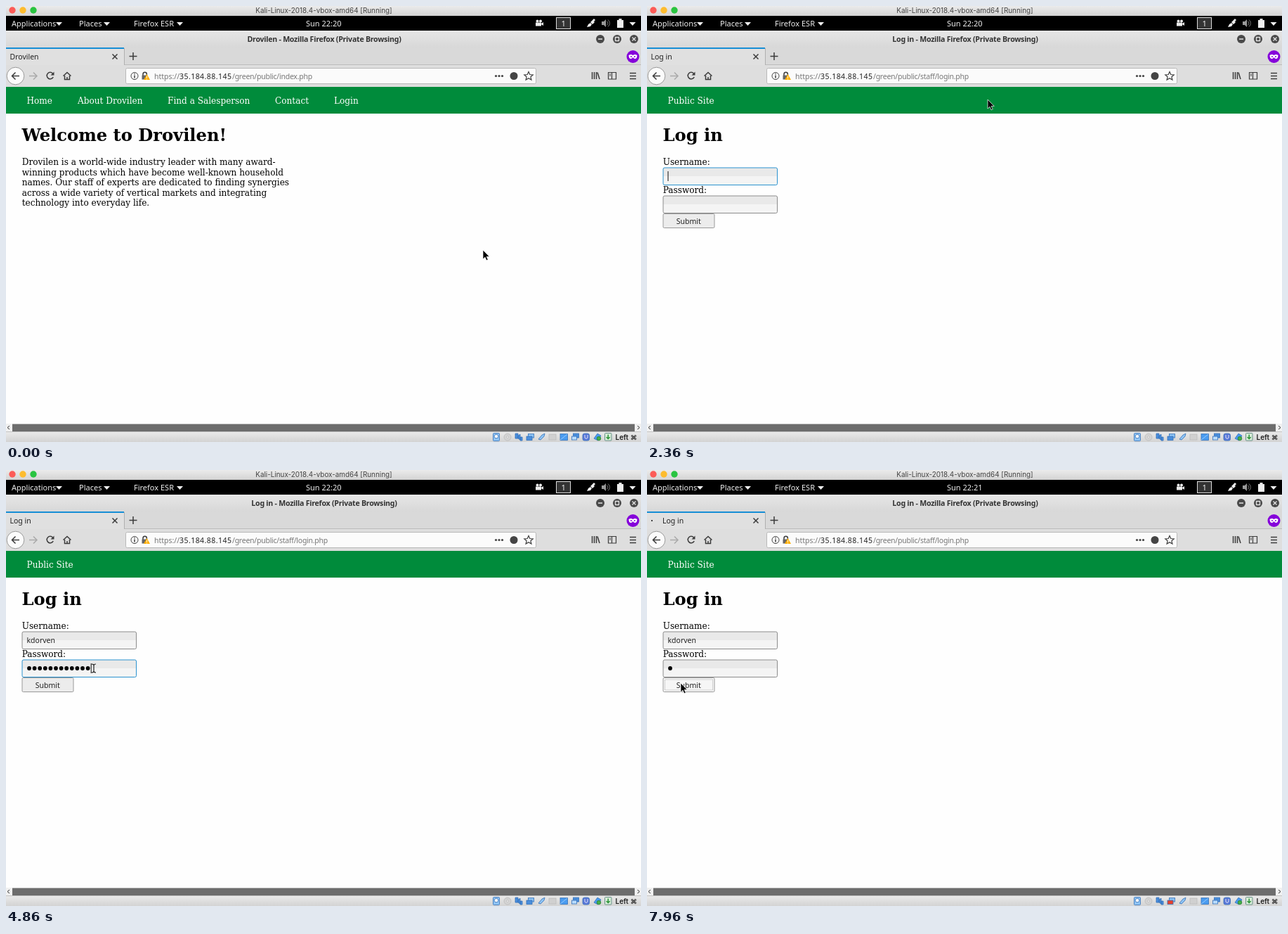
Animation, 904 px wide and 620 px high, one loop 8 s. Source, as an HTML page:

```html
<!DOCTYPE html>
<html lang="en">
<head>
<meta charset="utf-8">
<title>Login demo</title>
<style>
html, body { margin: 0; width: 100%; height: 100%; overflow: hidden; background: #fefefe; }
svg { display: block; }
text { white-space: pre; }
.ui { font: 10.5px "Noto Sans", "Open Sans", sans-serif; fill: #222; }
.panel { font: 11px "Noto Sans", "Open Sans", sans-serif; fill: #eee; }
.title { font: bold 10.6px "Noto Sans", "Open Sans", sans-serif; letter-spacing: -.25px; fill: #333; text-anchor: middle; }
.mac { font: 9.9px Inter, "Liberation Sans", sans-serif; fill: #444; text-anchor: middle; }
.page { font: 12.1px "DejaVu Serif", serif; fill: #000; }
.nav { fill: #fff; }
.h1 { font-size: 24.2px; font-weight: bold; }
.dim { fill: #777; }
.line { fill: none; stroke: #3c3c3c; stroke-width: 1.5; }
.field { fill: url(#input); stroke: #8c8c8c; }
.field.on { stroke: #2a92cf; }
</style>
</head>
<body>
<svg width="904" height="620" viewBox="0 0 904 620">
  <defs>
    <linearGradient id="mac" x2="0" y2="1"><stop stop-color="#ebebeb"/><stop offset="1" stop-color="#d3d3d3"/></linearGradient>
    <linearGradient id="bar" x2="0" y2="1"><stop stop-color="#e6e6e6"/><stop offset="1" stop-color="#d8d8d8"/></linearGradient>
    <linearGradient id="input" x2="0" y2="1"><stop offset=".5" stop-color="#e9e9e9"/><stop offset=".5" stop-color="#f4f4f4"/></linearGradient>
    <path id="drop" d="M-4.5 -2h9l-4.5 5z"/>
  </defs>
  <rect width="904" height="620" fill="#fefefe"/>

  <!-- host window bar -->
  <rect width="904" height="14" fill="url(#mac)"/>
  <circle cx="9" cy="6" r="4.7" fill="#fc5b57"/>
  <circle cx="24" cy="6" r="4.7" fill="#fdbc2e"/>
  <circle cx="39" cy="6" r="4.7" fill="#29c440"/>
  <text class="mac" x="452.5" y="10">Kali-Linux-2018.4-vbox-amd64 [Running]</text>

  <!-- desktop panel -->
  <rect y="14" width="904" height="21" fill="#000"/>
  <g class="panel">
    <text x="8" y="29">Applications</text><text x="104" y="29">Places</text>
    <text x="182" y="29">Firefox ESR</text><text id="clock" x="427" y="29"></text>
    <use href="#drop" x="75.5" y="25"/><use href="#drop" x="143.5" y="25"/><use href="#drop" x="247.5" y="25"/>
    <use href="#drop" x="892" y="25"/>
    <rect x="783.5" y="16.5" width="20" height="16" fill="#333" stroke="#ddd"/>
    <text x="790.5" y="29">1</text>
    <circle cx="756.5" cy="21.5" r="2"/><circle cx="761" cy="21.5" r="2"/>
    <path d="M754 23.5h8v5h-8zM762 25l3-2v5l-3-2z"/>
    <path d="M827 30l2-4 3-2 2 2-2 3zM832 23l3-3 3 3-3 3zM835 20l2-2 2 2-2 2z"/>
    <path d="M848 22h3l3-3v11l-3-3h-3z" fill="#999"/>
    <path d="M855.5 21.5q3 3 0 6M857 19.5q5 5 0 10" fill="none" stroke="#777"/>
    <path d="M870 20h2.500v-2h4v2H879v11h-9z"/>
  </g>

  <!-- browser chrome -->
  <rect y="35" width="904" height="80" fill="#d9d9d9"/>
  <rect y="35" width="904" height="24" fill="url(#bar)"/>
  <text id="title" class="title" x="453" y="51"></text>
  <g fill="#4a4a4a"><circle cx="846" cy="47" r="6"/><circle cx="870" cy="47" r="6"/><circle cx="894" cy="47" r="6"/></g>
  <path d="M843 47h6M867.500 44.500h5v5h-5zM891.500 44.500l5 5m0-5l-5 5" fill="none" stroke="#e4e4e4" stroke-width="1.3"/>
  <path d="M168 83.500h736" stroke="#bcbcbc"/>
  <rect y="59" width="168" height="26" fill="#e0e0e0"/>
  <rect y="84" width="904" height="31" fill="#dedede"/>
  <rect y="59" width="168" height="2" fill="#168ed5"/>
  <path d="M168.500 60v24" stroke="#b0b0b0"/>
  <path class="line" d="M151.500 68.500l7 7m0-7l-7 7M175.500 71.500h11m-5.500-5.500v11"/>
  <text id="tab" class="ui" y="75.500"></text>
  <path id="spinner" fill="#444"/>
  <circle cx="892.500" cy="72" r="9" fill="#8500da"/>
  <path d="M886.500 70q3-2 6 0 3-2 6 0 0 5-3 5-2 0-3-2-1 2-3 2-3 0-3-5z" fill="#fff"/>
  <circle cx="890" cy="72" r="1" fill="#8500da"/><circle cx="895" cy="72" r="1" fill="#8500da"/>
  <circle cx="13.500" cy="99.500" r="12.300" fill="#fbfbfb" stroke="#999"/>
  <path class="line" d="M19 99.500H8.500m5-5l-5 5 5 5"/>
  <path class="line" style="stroke:#aaa" d="M33 99.500h11m-5-5l5 5-5 5"/>
  <g id="reload"><path class="line" d="M66.500 96a4.700 4.700 0 1 0 .700 5"/><path d="M68.500 93.500v5h-5z" fill="#3c3c3c"/></g>
  <path id="stopping" d="M58 95.500l4 1.500v2z" fill="#777"/>
  <path class="line" d="M81.500 99.500l5.500-5 5.500 5M83.500 99v5.500h7V99M87 104v-3"/>
  <rect x="170.500" y="88.500" width="584" height="22" rx="2" fill="#fbfbfb" stroke="#b8b8b8"/>
  <circle class="line" style="stroke-width:1" cx="183" cy="99.500" r="5"/>
  <path class="line" d="M183 98.500v4m0-6.500v1.300"/>
  <path class="line" d="M195 99v-2a2.700 2.700 0 0 1 5.400 0v2"/>
  <rect x="193.500" y="98.500" width="7" height="6" fill="#666"/>
  <path d="M200.500 97l4.500 8h-9z" fill="#ffb000"/><path d="M200.500 100v2.500m0 1v1" stroke="#fff"/>
  <g class="ui">
    <text class="dim" x="211" y="103.500">https://</text>
    <text x="247" y="103.500" letter-spacing=".45">35.184.88.145</text>
    <text id="path" class="dim" x="322" y="103.500" letter-spacing="-.25"></text>
  </g>
  <g fill="#444"><circle cx="697.500" cy="99.500" r="1.600"/><circle cx="702" cy="99.500" r="1.600"/><circle cx="706.500" cy="99.500" r="1.600"/>
    <circle cx="723" cy="99.500" r="5.500"/></g>
  <path class="line" style="stroke-width:1.200" d="M744 93.500l1.800 4 4.400.400-3.300 2.900 1 4.300-3.900-2.300-3.900 2.300 1-4.300-3.300-2.900 4.400-.400z"/>
  <path class="line" d="M834.500 94v10m3-10v10m3-10v10m1.500-9.500l3 9.500M888 95.500h9m-9 4h9m-9 4h9"/>
  <path class="line" style="stroke-width:1.200" d="M857.500 94.500h11v9.500h-11zM862.500 94.500v9.500M859 97h2m-2 2h2"/>

  <!-- web page -->
  <rect y="115" width="904" height="38" fill="#008b3b"/>
  <g id="home" class="page">
    <g class="nav">
      <text x="29.500" y="139">Home</text><text x="102" y="139">About Drovilen</text>
      <text x="230" y="139">Find a Salesperson</text><text x="383" y="139">Contact</text><text x="467" y="139">Login</text>
    </g>
    <rect id="ring" x="466.500" y="127.500" width="36" height="15" fill="none" stroke="#cfe8d8" stroke-dasharray="1 1"/>
    <text class="h1" x="22.500" y="192">Welcome to Drovilen!</text>
    <text y="226.300"><tspan x="22.700">Drovilen is a world-wide industry leader with many award-</tspan><tspan x="22.700" dy="14.400">winning products which have become well-known household</tspan><tspan x="22.700" dy="14.400">names. Our staff of experts are dedicated to finding synergies</tspan><tspan x="22.700" dy="14.400">across a wide variety of vertical markets and integrating</tspan><tspan x="22.700" dy="14.400">technology into everyday life.</tspan></text>
  </g>
  <g id="login" class="page">
    <text class="nav" x="29.500" y="139">Public Site</text>
    <text class="h1" x="22.500" y="192">Log in</text>
    <text x="22.700" y="226.300">Username:</text><text x="22.700" y="266.300">Password:</text>
    <rect id="user" class="field" x="23" y="230" width="162.500" height="24.500" rx="2"/>
    <rect id="pass" class="field" x="23" y="270" width="162.500" height="24.500" rx="2"/>
    <text id="name" class="ui" x="29.500" y="246">kdorven</text>
    <rect id="sel" y="275" height="14" fill="#0d86cf"/>
    <g id="dots"></g>
    <rect id="caret" width="1" height="14" fill="#111"/>
    <rect id="button" x="23" y="295.500" width="73" height="20" rx="1.500" stroke="#999"/>
    <rect id="pressed" x="25.500" y="298" width="68" height="15" fill="none" stroke="#aaa" stroke-dasharray="1 1"/>
    <text class="ui" x="41.700" y="309.700" fill="#333">Submit</text>
  </g>

  <!-- scrollbar, link hint, machine status -->
  <rect y="594" width="904" height="11" fill="#f0f0f0"/>
  <rect x="9" y="594.500" width="886" height="10.500" fill="#6d6d6d"/>
  <path d="M5 597l-3 2.500 3 2.500M899 597l3 2.500-3 2.500" fill="none" stroke="#333"/>
  <g id="hint"><rect x="-1" y="587.500" width="257.500" height="18" fill="#dcdcdc" stroke="#b0b0b0"/>
    <text class="ui" x="1.500" y="600.300">https://35.184.88.145/green/public/staff/index.php</text></g>
  <rect y="605" width="904" height="15" fill="url(#mac)"/>
  <path d="M0 605.500h904" stroke="#c4c4c4"/>
  <g stroke="#3470b8" stroke-width=".8">
    <rect x="693.500" y="607.500" width="9" height="11" rx="1" fill="#8fc4f4"/><circle cx="698" cy="612" r="2.800" fill="#fff"/>
    <circle cx="714" cy="613" r="5" fill="#d4d4d4" stroke="#bbb"/><circle cx="714" cy="613" r="1.500" fill="#eee" stroke="#bbb"/>
    <path d="M725 608h4v7h-4zM729 611l3-2v8l-3-2zM732 613h3v5h-3z" fill="#4a8edc"/>
    <g id="net"><rect x="743.500" y="608.500" width="8" height="5.500" fill="#8fc4f4"/><rect x="741" y="612" width="8" height="5.500"/></g>
    <path d="M758 616l5-6 4-2-1 4-5 5z" fill="#8fc4f4"/>
    <rect x="773" y="609" width="10" height="8" fill="#d0d0d0" stroke="#bbb"/>
    <rect x="789" y="608.500" width="10.500" height="9" fill="#4a9cf0"/><path d="M789 617l10-8" stroke="#a8d4ff"/>
    <rect x="807.500" y="608" width="8" height="6" fill="#4a8edc"/><rect x="805.500" y="612" width="7" height="5" fill="#b8dcff"/>
    <rect x="821" y="608" width="9.500" height="10" rx="2.500" fill="#5b78d8"/><path d="M824 610v4q2 3 4 0v-4" fill="none" stroke="#fff"/>
    <path d="M837 615l5-7 5 3-4 7z" fill="#4a9cf0"/><circle cx="844" cy="615" r="2.800" fill="#44b04a" stroke="#2a8030"/>
    <rect x="852.500" y="607.500" width="9.500" height="10.500" rx="1" fill="#d8ecd8" stroke="#4f7f78"/><path d="M857.200 609.500v6m-2.500-2.500l2.500 2.500 2.500-2.500" fill="none" stroke="#2c9438" stroke-width="1.500"/>
  </g>
  <text x="867.500" y="617" font-family="Inter, 'DejaVu Sans', sans-serif" font-size="10" font-weight="600" fill="#222">Left ⌘</text>

  <path id="arrow" d="M0 0v13l3-2.800 2 4.600 2.200-1-2-4.400h4z" fill="#000" stroke="#fff" stroke-width=".7"/>
  <path id="beam" d="M-3-6q3 0 3 2 0-2 3-2M0-4v8M-3 6q3 0 3-2 0 2 3 2" fill="none" stroke="#222" stroke-width="1.200"/>
</svg>
<script>
const LOOP = 8000, STEP = 147.2, PITCH = 7.6;
const $ = id => document.getElementById(id);
const show = (id, on) => { $(id).style.display = on ? '' : 'none'; };
const set = (id, attrs) => { for (const a in attrs) $(id).setAttribute(a, attrs[a]); };
const within = (k, a, b) => k >= a && k <= b;

// pointer stops: step, x, y
const stops = [
  [0, 679, 347], [1, 668, 335], [2, 630, 296], [4, 541, 200], [5, 508, 165], [6, 492, 148], [7, 488, 144],
  [9, 488, 144], [11, 485, 134], [12, 485, 133], [17, 485, 133], [18, 465, 145], [20, 300, 222], [21, 205, 246],
  [22, 145, 254], [23, 128, 253], [25, 122, 260], [27, 121, 265], [29, 121, 265], [31, 124, 281],
  [32, 125, 282], [34, 125, 282], [35, 121, 282], [38, 78, 284], [39, 61, 285], [40, 52, 285],
  [42, 45, 285], [46, 45, 285], [49, 47, 299], [51, 48, 303], [55, 48, 303]
];

function pointer(k) {
  const i = Math.max(1, stops.findIndex(s => s[0] >= k));
  const [a, ax, ay] = stops[i - 1], [b, bx, by] = stops[i];
  const p = (k - a) / (b - a);
  return [ax + (bx - ax) * p, ay + (by - ay) * p];
}

const dots = Array.from({ length: 12 }, (_, i) => {
  const c = document.createElementNS('http://www.w3.org/2000/svg', 'circle');
  c.setAttribute('cx', 33 + PITCH * i);
  c.setAttribute('cy', 282);
  c.setAttribute('r', 2.9);
  return $('dots').appendChild(c);
});

function draw(k) {
  const loggingIn = k >= 16, opening = within(k, 13, 15), sending = k >= 54;
  const filled = k >= 27, inPass = within(k, 32, 51), clicked = k >= 52;
  const name = loggingIn ? 'Log in' : 'Drovilen';

  $('clock').textContent = k < 36 ? 'Sun 22:20' : 'Sun 22:21';
  $('title').textContent = name + ' - Mozilla Firefox (Private Browsing)';
  $('tab').textContent = name;
  set('tab', { x: opening || sending ? 22 : 5.5 });
  $('path').textContent = '/green/public/' + (loggingIn ? 'staff/login.php' : 'index.php');
  show('spinner', opening || sending);
  set('spinner', { d: sending ? 'M6 71h2v2h-2z' : 'M10 71h5v2h-5z' });
  show('reload', !opening);
  show('stopping', opening);
  show('hint', within(k, 11, 15));
  set('net', { fill: opening || k >= 53 ? '#e8402c' : '#4a8edc' });

  show('home', !loggingIn);
  show('login', loggingIn);
  show('ring', opening);
  $('user').classList.toggle('on', k < 32);
  $('pass').classList.toggle('on', inPass);
  show('name', filled);

  const count = !filled ? 0 : k < 46 ? 12 : k < 47 ? 2 : 1;
  const from = within(k, 35, 45) ? [12, 11, 10, 8, 6, 4, 3][k - 35] ?? 2 : 12;
  dots.forEach((c, i) => {
    c.style.display = i < count ? '' : 'none';
    c.style.fill = i >= from ? '#fff' : '#000';
  });
  set('sel', { x: 29.2 + PITCH * from, width: PITCH * (12 - from) });
  show('caret', !clicked && from === 12);
  set('caret', inPass ? { x: 29.5 + PITCH * count, y: 275 } : { x: filled ? 70 : 29.5, y: 235 });
  set('button', { fill: clicked ? '#f6f6f6' : '#ececec' });
  show('pressed', clicked);

  const beam = within(k, 31, 48), [x, y] = pointer(k);
  show('arrow', !beam);
  show('beam', beam);
  set(beam ? 'beam' : 'arrow', { transform: `translate(${x} ${y})` });
}

let last = -1;
function tick() {
  const k = Math.floor((performance.now() % LOOP + 4) / STEP);
  if (k !== last) draw(last = k);
  requestAnimationFrame(tick);
}
tick();
</script>
</body>
</html>
```
